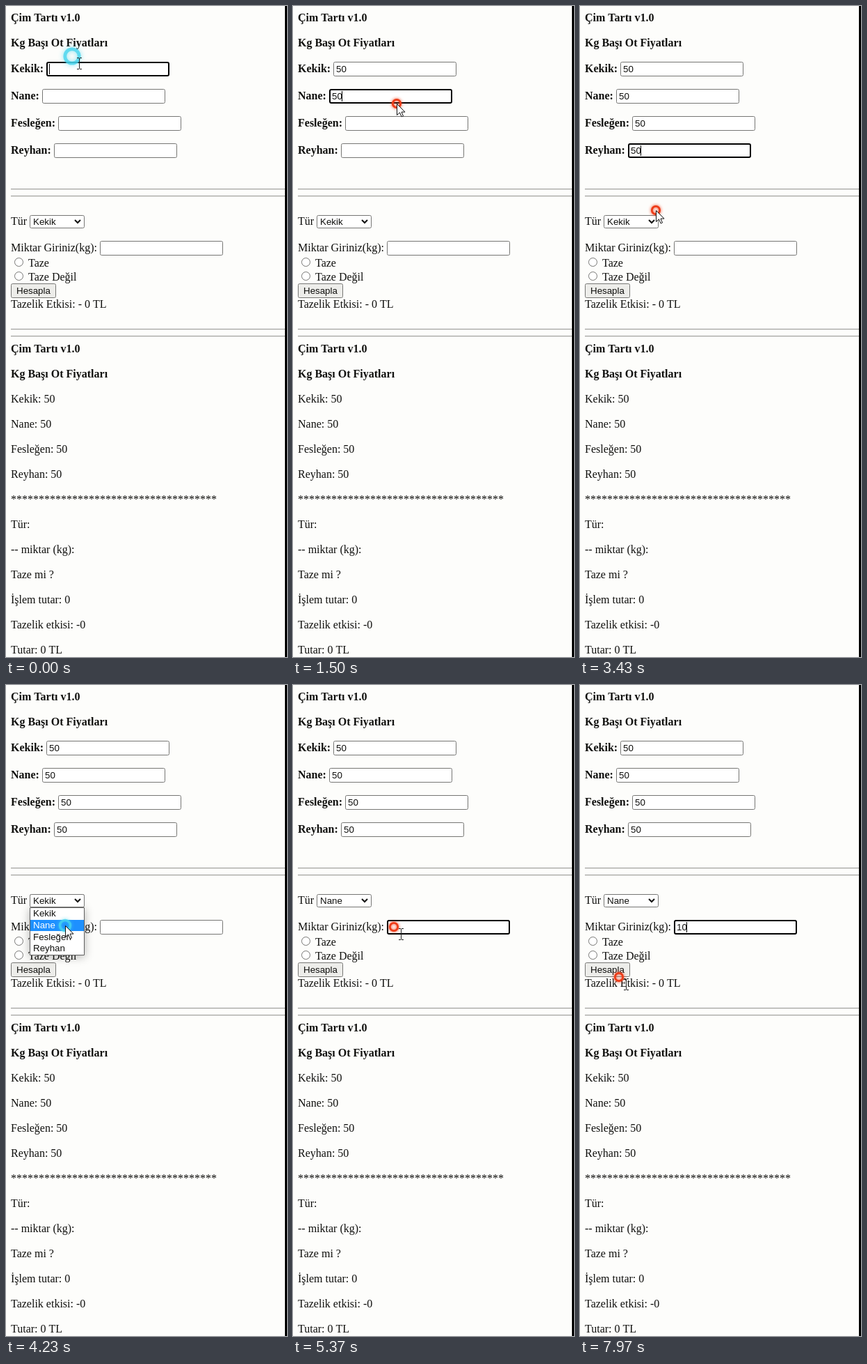
Write an HTML page with a canvas that moves like this. It is 404 by 934 pixels and loops after 8000 ms.

```html
<!DOCTYPE html>
<html lang="tr">
<head>
<meta charset="utf-8">
<title>Ot fiyatları</title>
<style>
html, body { margin: 0; width: 100%; height: 100%; overflow: hidden; background: #fdfdfb; }
canvas { display: block; }
</style>
</head>
<body>
<canvas id="stage" width="404" height="934"></canvas>
<script>
const ctx = document.getElementById('stage').getContext('2d');
const LOOP = 8000, PRESS = 200, LEAD = 50, KEY_DELAY = 180, KEY_GAP = 280, BLINK = 500;
const INK = '#10100e', GREY = '#767674', PAPER = '#fdfdfb', LEFT = 7;
const SERIF = '16px "Liberation Serif", "Times New Roman", serif';
const BOLD = 'bold ' + SERIF;
const SANS = '13.333px "Liberation Sans", Arial, sans-serif';
const TITLE = 'Çim Tartı v1.0', HEADING = 'Kg Başı Ot Fiyatları';
const herbs = ['Kekik', 'Nane', 'Fesleğen', 'Reyhan'];
const arrow = new Path2D('M0 0V16L4 12.4L6.6 18.4L9 17.4L6.5 11.6H11.5Z');

// Where the pointer rests: it arrives at "at" and leaves at "go".
const stops = [
  { kind: 'field', at: -10, go: 500, x: 95, y: 72 },
  { kind: 'field', at: 920, go: 1250, x: 143, y: 120 },
  { kind: 'field', at: 1800, go: 2200, x: 158, y: 166 },
  { kind: 'field', at: 2620, go: 3060, x: 161, y: 201 },
  { kind: 'menu', at: 3550, go: 3700, x: 100, y: 309 },
  { kind: 'menu', at: 4130, go: 4260, x: 85, y: 345 },
  { kind: 'field', at: 4770, go: 5500, x: 145, y: 347 },
  { kind: 'rest', at: 6000, go: 6530, x: 157, y: 366 },
  { kind: 'rest', at: 6960, go: 7570, x: 156, y: 384 },
  { kind: 'text', at: 7950, go: LOOP, x: 56, y: 419 }
];
const clicks = stops.filter(s => s.kind === 'field' || s.kind === 'menu');
const [opener, option] = stops.filter(s => s.kind === 'menu');

// Each field has focus from its own click until the next one.
const fields = clicks.filter(s => s.kind === 'field').map((stop, i) => {
  const next = clicks[clicks.indexOf(stop) + 1];
  const span = { on: stop.at, off: next ? next.at : LOOP };
  if (i === herbs.length) {
    return { ...span, x: 135, y: 337, value: '10', typeAt: stop.at + 1750 };
  }
  const label = herbs[i] + ': ';
  ctx.font = BOLD;
  const x = Math.round(LEFT + ctx.measureText(label).width);
  return { ...span, label, x, y: 80 + 39 * i, value: '50', typeAt: stop.at + KEY_DELAY };
});

function text(s, x, y, font = SERIF, color = INK) {
  ctx.font = font;
  ctx.fillStyle = color;
  ctx.fillText(s, x, y);
}

function rect(x, y, w, h, color) {
  ctx.fillStyle = color;
  ctx.fillRect(x, y, w, h);
}

function box(x, y, w, h, fill, stroke, line = 1, radius = 2) {
  ctx.beginPath();
  ctx.roundRect(x + line / 2, y + line / 2, w - line, h - line, radius);
  ctx.fillStyle = fill;
  ctx.fill();
  ctx.strokeStyle = stroke;
  ctx.lineWidth = line;
  ctx.stroke();
}

function doubleRule(y) {
  for (const top of [y, y + 10]) {
    rect(LEFT, top, 394, 1, '#a2a2a0');
    rect(LEFT, top + 1, 394, 1, '#e8e8e4');
  }
}

function radio(y, label) {
  box(12, y - 6.5, 13, 13, '#fff', GREY, 1, 6);
  text(label, 32, y + 6.5);
}

function drawField(f, t) {
  const focused = t >= f.on && t < f.off;
  if (f.label) text(f.label, LEFT, f.y + 15, BOLD);
  box(f.x, f.y, 177, 21, '#fff', focused ? '#000' : GREY, focused ? 2 : 1);

  const count = Math.max(0, Math.min(f.value.length, Math.floor((t - f.typeAt) / KEY_GAP) + 1));
  const typed = f.value.slice(0, count);
  text(typed, f.x + 4, f.y + 15, SANS);

  const lastEdit = count ? f.typeAt + (count - 1) * KEY_GAP : f.on;
  if (focused && Math.floor((t - lastEdit) / BLINK) % 2 === 0) {
    rect(Math.floor(f.x + 4 + ctx.measureText(typed).width), f.y + 3, 1, 15, '#000');
  }
}

function drawSelect(t) {
  box(34, 300, 79, 19, '#fff', GREY);
  text(herbs[t < option.go ? 0 : 1], 39, 314, SANS);
  ctx.beginPath();
  ctx.moveTo(99, 307);
  ctx.lineTo(103, 311);
  ctx.lineTo(107, 307);
  ctx.strokeStyle = INK;
  ctx.lineWidth = 2;
  ctx.stroke();
}

function drawMenu(t) {
  if (t < opener.at || t >= option.go) return;
  ctx.save();
  ctx.shadowColor = 'rgba(0,0,0,.3)';
  ctx.shadowBlur = 12;
  ctx.shadowOffsetY = 2;
  rect(34, 319, 79, 69, '#fff');
  ctx.restore();
  box(34, 319, 79, 69, '#fff', '#606060', 1, 0);
  drawSelect(t);
  const active = pointerAt(t).y < 337 ? 0 : 1;
  herbs.forEach((name, i) => {
    const y = 320 + Math.round(i * 16.75);
    if (i === active) rect(35, y, 77, 16, '#1e90ff');
    text(name, 39, y + 12, SANS, i === active ? '#fff' : INK);
  });
}

function drawHeader(y) {
  text(TITLE, LEFT, y, BOLD);
  text(HEADING, LEFT, y + 36, BOLD);
}

function drawForm(t) {
  drawHeader(22);
  doubleRule(262);
  text('Tür', LEFT, 314);
  drawSelect(t);
  text('Miktar Giriniz(kg):', LEFT, 352);
  fields.forEach(f => drawField(f, t));
  radio(367.5, 'Taze');
  radio(387.5, 'Taze Değil');
  box(LEFT, 398, 65, 21, '#ededea', GREY);
  text('Hesapla', 15, 413, SANS);
  text('Tazelik Etkisi: - 0 TL', LEFT, 433);
}

function drawReceipt() {
  doubleRule(463);
  drawHeader(497);
  const lines = [
    ...herbs.map(h => h + ': 50'), '*'.repeat(37), 'Tür:', '-- miktar (kg):',
    'Taze mi ?', 'İşlem tutar: 0', 'Tazelik etkisi: -0', 'Tutar: 0 TL'
  ];
  lines.forEach((s, i) => text(s, LEFT, 569 + i * 36));
}

function pointerAt(t) {
  const i = stops.findLastIndex(s => t >= s.at);
  const from = stops[i], to = stops[i + 1];
  if (t < from.go || !to) {
    return { x: from.x, y: from.y, beam: from.kind === 'field' || from.kind === 'text' };
  }
  const p = (t - from.go) / (to.at - from.go);
  const ease = p * p * (3 - 2 * p);
  return { x: from.x + (to.x - from.x) * ease, y: from.y + (to.y - from.y) * ease };
}

function ring(x, y, r, width, color, glow) {
  ctx.save();
  ctx.shadowColor = color;
  ctx.shadowBlur = glow;
  ctx.strokeStyle = color;
  ctx.lineWidth = width;
  ctx.beginPath();
  ctx.arc(x, y, r, 0, Math.PI * 2);
  ctx.stroke();
  ctx.restore();
}

function drawBeam(x, y) {
  rect(x, y - 7, 1, 15, '#222');
  for (const dy of [-8, 8]) {
    rect(x - 3, y + dy, 3, 1, '#222');
    rect(x + 1, y + dy, 3, 1, '#222');
  }
}

function drawArrow(x, y) {
  ctx.save();
  ctx.translate(x + 0.5, y + 0.5);
  ctx.fillStyle = '#fff';
  ctx.strokeStyle = '#111';
  ctx.lineWidth = 1;
  ctx.fill(arrow);
  ctx.stroke(arrow);
  ctx.restore();
}

function drawPointer(t) {
  const p = pointerAt(t), x = Math.round(p.x), y = Math.round(p.y);
  const since = Math.min(...clicks.map(c => t - c.at + LEAD).filter(d => d >= 0));
  if (since < PRESS) {
    const k = 1 - since / PRESS;
    ring(x, y, 6 + 6 * k, 3 + 2.5 * k, 'rgba(70,212,238,.8)', 4 + 5 * k);
  } else {
    ring(x, y, 5.7, 2.8, '#ee3c18', 4);
  }
  if (p.beam) drawBeam(x + 10, y + 10);
  else drawArrow(x, y);
}

function draw(now) {
  const t = now % LOOP;
  rect(0, 0, 404, 934, PAPER);
  drawForm(t);
  drawReceipt();
  drawMenu(t);
  rect(401, 0, 3, 934, '#000');
  drawPointer(t);
}

let start;
function tick(now) {
  start ??= now;
  draw(now - start);
  requestAnimationFrame(tick);
}
draw(0);
requestAnimationFrame(tick);
</script>
</body>
</html>
```
